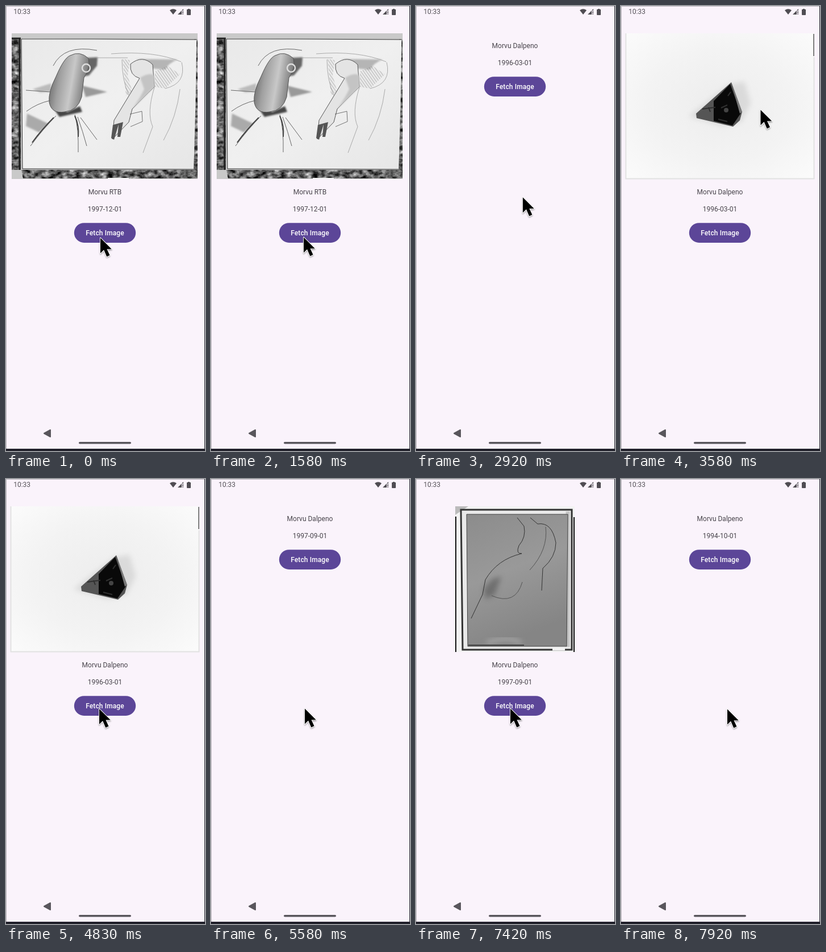
An HTML page for the animation above (8 s loop, 350 by 782 pixels).

```html
<!DOCTYPE html>
<html lang="en">
<head>
<meta charset="utf-8">
<title>Fetch Image</title>
<style>
  html, body { margin: 0; width: 100%; height: 100%; overflow: hidden; background: #faf3fb; }
  svg { display: block; width: 350px; height: 782px; }
  text { font: 12px Roboto, sans-serif; fill: #47434a; }
  .label { text-anchor: middle; }
  #clock { fill: #57535a; }
  #button text { font-weight: 500; letter-spacing: .1px; fill: #fff; }
</style>
</head>
<body>
<svg viewBox="0 0 350 782">
  <defs>
    <linearGradient id="paper" x2="1" y2="1">
      <stop stop-color="#e9e9e9"/><stop offset=".5" stop-color="#f0f0f0"/><stop offset="1" stop-color="#e6e6e6"/>
    </linearGradient>
    <linearGradient id="limb" x2="1" y2=".25">
      <stop stop-color="#555"/><stop offset=".35" stop-color="#a0a0a0"/>
      <stop offset=".65" stop-color="#c8c8c8"/><stop offset="1" stop-color="#777"/>
    </linearGradient>
    <radialGradient id="table" r=".7">
      <stop stop-color="#ededed"/><stop offset=".55" stop-color="#f3f3f3"/><stop offset="1" stop-color="#fbfbfb"/>
    </radialGradient>
    <linearGradient id="plate" x2=".3" y2="1">
      <stop stop-color="#8c8c8c"/><stop offset=".5" stop-color="#999"/><stop offset="1" stop-color="#858585"/>
    </linearGradient>
    <pattern id="hatch" width="4" height="4" patternUnits="userSpaceOnUse" patternTransform="rotate(55)">
      <path d="M0 2H4" stroke="#777" stroke-width="1"/>
    </pattern>
    <filter id="soft" x="-30%" y="-30%" width="160%" height="160%"><feGaussianBlur stdDeviation="5"/></filter>
    <filter id="smudge" x="-30%" y="-30%" width="160%" height="160%"><feGaussianBlur stdDeviation="1.6"/></filter>
    <filter id="marble" color-interpolation-filters="sRGB">
      <feTurbulence type="fractalNoise" baseFrequency=".09 .13" numOctaves="3" seed="4"/>
      <feColorMatrix values="1.3 0 0 0 -.27  1.3 0 0 0 -.27  1.3 0 0 0 -.27  0 0 0 0 1"/>
      <feComposite in2="SourceGraphic" operator="in"/>
    </filter>
    <filter id="shade" x="-40%" y="-40%" width="180%" height="180%">
      <feDropShadow dx="0" dy="1.5" stdDeviation="1.3" flood-opacity=".4"/>
    </filter>
  </defs>

  <rect width="350" height="782" fill="#faf3fb"/>
  <path d="M.5 778V.5H349" fill="none" stroke="#b9b4bc"/>
  <path d="M349 0h1v782H0v-4h349z" fill="#20202a"/>

  <text id="clock" x="13.2" y="14.2">10:33</text>
  <g fill="#504d53">
    <path d="M288 7.5Q294 2.8 300 7.5L294 15z"/>
    <path d="M302 15L312 5V8H309V15z"/>
    <path d="M310.3 9h1.5v3.7h-1.5zM310.3 13.6h1.5V15h-1.5z"/>
    <path d="M320 5h3v1h2v9q0 1-1 1h-5q-1 0-1-1V6h2z"/>
  </g>

  <!-- Sketchbook page -->
  <g class="photo">
    <path d="M10 48H337V304H10z" fill="#c9c9c9"/>
    <path d="M10 56H26V288H10zM27 288H337V303H30zM331 58H337V290H330z" filter="url(#marble)"/>
    <path d="M10 57H26M24 57V288" stroke="#222" stroke-width="3"/>
    <path d="M179 303H216" stroke="#f2f2f2" stroke-width="2"/>
    <path d="M27 57L335 59Q334 180 330 287L29 286z" fill="url(#paper)"/>
    <path d="M330 287L29 286L27 58H150L335 59" fill="none" stroke="#333"/>
    <g filter="url(#smudge)">
      <path d="M37 189L75 207L58 222L35 211z" fill="#aaa"/>
      <path d="M47 146L79 136L80 150L60 152z" fill="#bbb"/>
      <path d="M81 176L108 186L130 176L134 186L94 195z" fill="#444"/>
      <path d="M142 91L161 90L160 105L146 122L134 124z" fill="#666"/>
      <path d="M134 140L178 151L140 160z" fill="#999"/>
      <path d="M218 93L302 94Q286 100 280 112L258 110Q244 92 218 93z" fill="#b5b5b5"/>
    </g>
    <path d="M205 93L218 95L214 122L222 150L211 158zM262 115L284 105L306 120L280 145L262 142z" fill="url(#hatch)" opacity=".6"/>
    <g stroke="#555" stroke-linejoin="round">
      <path d="M113 87Q130 78 145 92Q149 110 137 126L133 160Q126 184 103 186Q80 190 76 169Q74 151 88 124Q102 91 113 87z" fill="url(#limb)"/>
      <path d="M219 102Q240 85 258 103L261 142Q239 163 222 181L216 204L187 234L190 201L210 168L235 127Q217 122 219 102z" fill="#e4e4e4"/>
    </g>
    <path d="M236 126Q252 116 261 122V142L222 181Q237 160 243 146z" fill="#c4c4c4" filter="url(#smudge)"/>
    <path d="M188 209L185 232L190 235L198 208L196 230L201 230L206 204z" fill="#555"/>
    <circle cx="141" cy="109" r="7" fill="none" stroke="#ddd" stroke-width="2.5"/>
    <g fill="none" stroke="#666">
      <path d="M83 105Q102 67 160 78M35 148L78 151M36 185Q55 171 78 166M43 246Q66 215 88 193M121 191Q128 215 127 257M126 195Q135 220 142 246M131 196L160 235"/>
      <path d="M46 240Q62 218 84 196M121 193Q129 211 127 230" stroke="#444" stroke-width="2"/>
    </g>
    <g fill="none" stroke="#999" stroke-width=".8">
      <path d="M158 91L214 91M185 84Q260 78 308 98M204 94Q204 130 216 157M309 99Q318 136 280 145M261 143Q247 188 258 212L241 258M306 146Q300 195 277 236"/>
      <path d="M218 190L239 185L240 203L219 212" stroke="#555"/>
    </g>
  </g>

  <!-- Dark shard -->
  <g class="photo">
    <path d="M8 48H340V304H8z" fill="url(#table)"/>
    <path d="M8.5 48V303.5H339.5V90" fill="none" stroke="#e2e2e2" stroke-width="2"/>
    <path d="M339 49V88" stroke="#555" stroke-width="1.5"/>
    <path d="M190 138L217 133L228 171L212 203L180 211L119 194z" fill="#dadada" filter="url(#soft)"/>
    <path d="M194 134L213 186L209 201L197 212L133 197L132 189z" fill="#555"/>
    <path d="M192 137L204 170L211 188L196 210L163 202V167z" fill="#090909"/>
    <path d="M194 134L213 186L209 189L204 171z" fill="#777"/>
    <path d="M143 181L166 178M154 178L157 186M176 179L187 174M171 199L187 203M188 158L193 151" fill="none" stroke="#303030" stroke-width="2"/>
    <circle cx="185" cy="183" r="4" fill="#444"/>
  </g>

  <!-- Gray plate -->
  <g class="photo">
    <path d="M69 48H279V304H69z" fill="#f3f3f3"/>
    <path d="M69 48H92L69 63z" fill="#bbb"/>
    <path d="M70 66V304M278 67V304" stroke="#111" stroke-width="2"/>
    <path d="M79 54H274V300H82z" fill="#e9e9e9" stroke="#333" stroke-width="3"/>
    <path d="M267 57V295" stroke="#c5c5c5" stroke-width="7"/>
    <path d="M89 62H267L265 294H91z" fill="url(#plate)" stroke="#444"/>
    <path d="M92 292H190" stroke="#444" stroke-width="2"/>
    <path d="M125 288Q160 274 185 288" fill="none" stroke="#aaa" stroke-width="6" filter="url(#soft)"/>
    <path d="M240 299H262" stroke="#f3f3f3" stroke-width="5"/>
    <path d="M134 176L150 171L138 204L122 211L119 193z" fill="#555" opacity=".6" filter="url(#soft)"/>
    <g fill="none" stroke="#333">
      <path d="M178 68L190 83Q194 102 181 117Q175 132 186 131Q143 141 122 177L117 203L97 245"/>
      <path d="M201 68L214 79Q239 75 246 112Q246 137 223 157L221 196"/>
      <path d="M133 205Q175 223 187 181M228 84Q233 124 200 160" stroke="#555"/>
    </g>
  </g>

  <g id="details">
    <text id="title" class="label" x="174" y="331"></text>
    <text id="date" class="label" x="174" y="361"></text>
    <g id="button">
      <rect x="119.8" y="381.3" width="108.4" height="34.6" rx="17.3" fill="#5c4698"/>
      <text class="label" x="174" y="403">Fetch Image</text>
    </g>
  </g>

  <path d="M67 751L78 745V757z" fill="#59565c" stroke="#59565c" stroke-width="2" stroke-linejoin="round"/>
  <rect x="128" y="766" width="92" height="3.6" rx="1.8" fill="#59565c"/>

  <path id="cursor" d="M.5 1.5V28.5L6.6 22.6L11.8 34.5L17 32L12 21.2H20.3z" stroke="#fff" stroke-width="1.8" stroke-linejoin="round" paint-order="stroke" filter="url(#shade)"/>
</svg>

<script>
  const DURATION = 8000;
  const COLLAPSE = -257;

  // A null photo means the next image is still loading.
  const scenes = [
    { at: 0, photo: 0, title: "Morvu RTB", date: "1997-12-01" },
    { at: 2920, photo: null, title: "Morvu Dalpeno", date: "1996-03-01" },
    { at: 3500, photo: 1, title: "Morvu Dalpeno", date: "1996-03-01" },
    { at: 5250, photo: null, title: "Morvu Dalpeno", date: "1997-09-01" },
    { at: 6000, photo: 2, title: "Morvu Dalpeno", date: "1997-09-01" },
    { at: 7750, photo: null, title: "Morvu Dalpeno", date: "1994-10-01" }
  ];

  // Pointer stops: time, x, y
  const stops = [
    [0, 165.5, 406], [590, 165.5, 406], [950, 166, 434], [1420, 162.5, 410],
    [1580, 162.5, 405], [2250, 162.5, 401], [2830, 162.5, 401],
    [3080, 245, 181], [3600, 245, 181], [4100, 164, 411],
    [4400, 163.5, 403], [5170, 163.5, 402], [6000, 165.5, 402],
    [7670, 165.5, 402], [7920, 186.5, 403], [8000, 190, 402]
  ];

  const byId = id => document.getElementById(id);
  const photos = document.querySelectorAll(".photo");
  const ease = p => p * p * (3 - 2 * p);

  function pointerAt(time) {
    const next = stops.findIndex(stop => stop[0] > time);
    const [t0, x0, y0] = stops[next - 1];
    const [t1, x1, y1] = stops[next];
    const p = ease((time - t0) / (t1 - t0));
    return [x0 + (x1 - x0) * p, y0 + (y1 - y0) * p];
  }

  function render(time) {
    const scene = scenes.findLast(({ at }) => at <= time);
    photos.forEach((photo, i) => {
      photo.style.display = i === scene.photo ? "" : "none";
    });
    byId("title").textContent = scene.title;
    byId("date").textContent = scene.date;
    byId("details").setAttribute("transform", `translate(0 ${scene.photo === null ? COLLAPSE : 0})`);
    byId("cursor").setAttribute("transform", `translate(${pointerAt(time)})`);
  }

  const start = performance.now();
  function tick() {
    render((performance.now() - start) % DURATION);
    requestAnimationFrame(tick);
  }
  tick();
</script>
</body>
</html>
```
